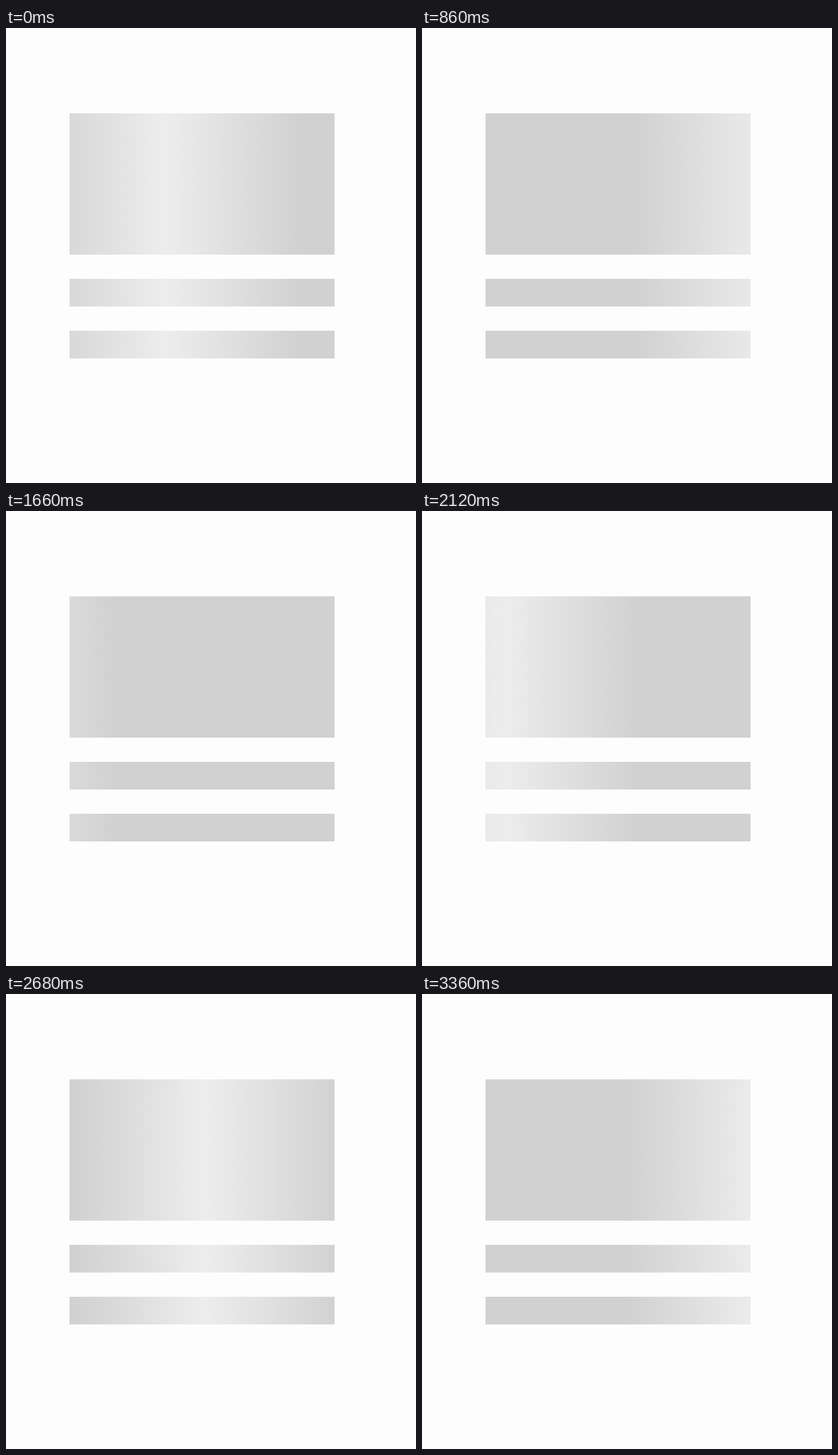
Write an HTML page with a canvas that moves like this. It is 710 by 789 pixels and loops after 3.38 s.

```html
<!DOCTYPE html>
<html lang="en">
<head>
<meta charset="utf-8">
<title>Loading placeholder</title>
<style>
html, body { margin: 0; width: 100%; height: 100%; overflow: hidden; background: #fdfdfd; }
canvas { display: block; }
</style>
</head>
<body>
<canvas id="stage" width="710" height="789"></canvas>
<script>
const LOOP = 3380, LEFT = 110, WIDTH = 459;
const SWEEP = 2 * WIDTH, STEP = SWEEP / 54;
const FIRST_SHIFT = 61; // shine offset from the blocks at step 1
const blocks = [[148, 245], [435, 48], [525, 48]]; // top, height
const ctx = document.getElementById('stage').getContext('2d');

// Steps come in threes: two short ones, then a long one
function stepAt(ms) {
  const t = ms + 20;
  return 3 * Math.floor(t / 140) + Math.min(2, Math.floor(t % 140 / 20));
}

function draw(now) {
  const travel = FIRST_SHIFT - 122 + WIDTH + (stepAt(now % LOOP) - 1) * STEP;
  const start = LEFT + travel % SWEEP - WIDTH;
  const shine = ctx.createLinearGradient(start, 0, start + WIDTH, 0);
  shine.addColorStop(0, '#d1d1d1');
  shine.addColorStop(0.5, '#ededed');
  shine.addColorStop(1, '#d1d1d1');

  ctx.fillStyle = '#fdfdfd';
  ctx.fillRect(0, 0, 710, 789);
  ctx.fillStyle = shine;
  for (const [top, height] of blocks) ctx.fillRect(LEFT, top, WIDTH, height);
}

function tick() {
  draw(performance.now());
  requestAnimationFrame(tick);
}
tick();
</script>
</body>
</html>
```
